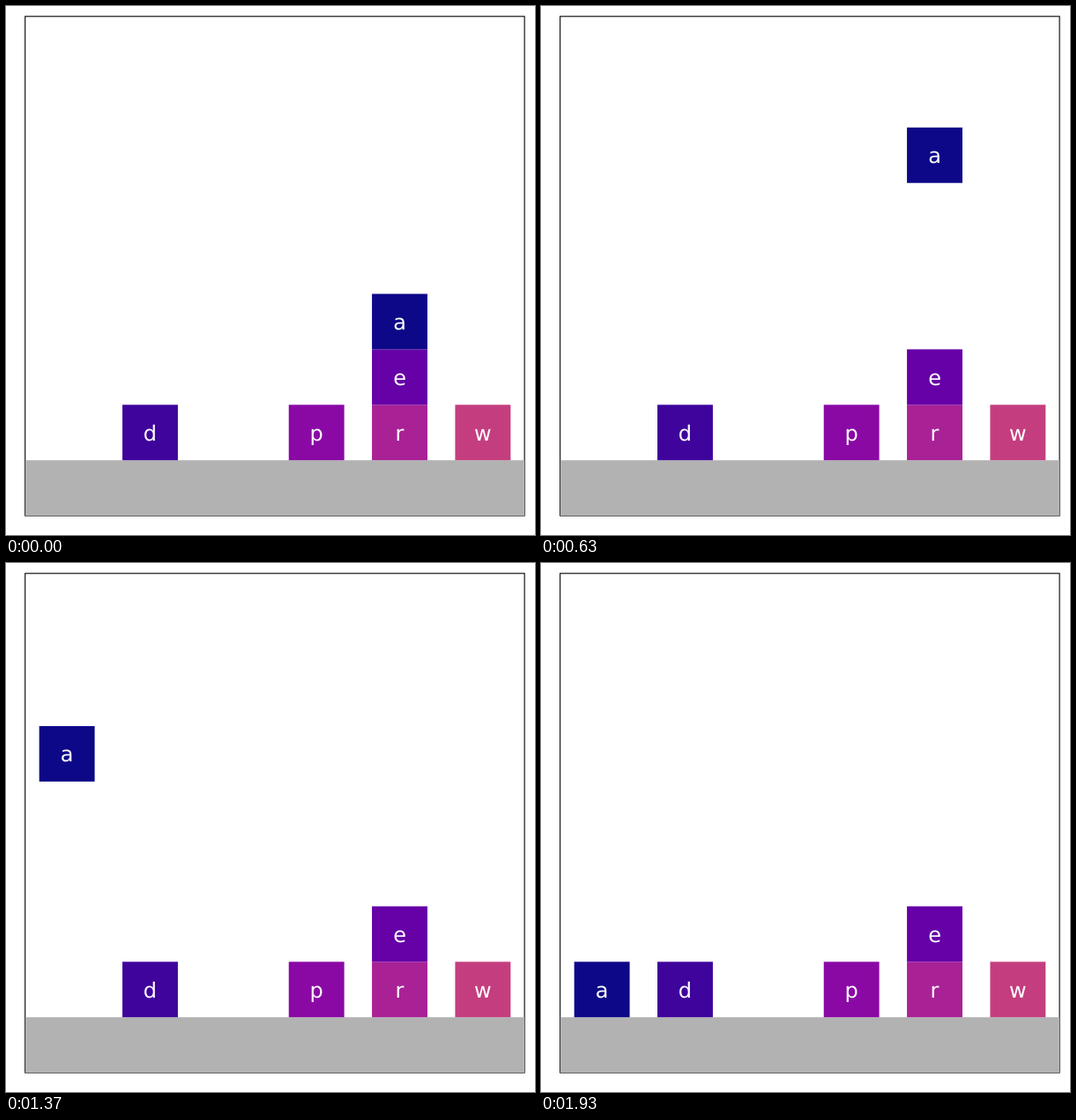
Write an HTML page that moves like this. It is 600 px wide and 600 px high and loops after 1.96 s.

```html
<!DOCTYPE html>
<html lang="en">
<head>
<meta charset="utf-8">
<title>Stacking blocks</title>
<style>
  html, body { margin: 0; width: 100%; height: 100%; overflow: hidden; background: #fff; }
  svg { display: block; width: 100vw; height: 100vh; }
  text {
    font: 24px "DejaVu Sans", sans-serif;
    fill: #fff;
    text-anchor: middle;
    text-rendering: geometricPrecision;
  }
</style>
</head>
<body>
<svg id="stage" viewBox="0 0 600 600"></svg>
<script>
const LOOP = 1960;
const UNIT = 62.9;
const LEFT = 21.95;
const TOP = 12;
const stage = document.getElementById("stage");

const colX = col => LEFT + (0.25 + 1.5 * col) * UNIT;
const rowY = row => TOP + (7 - row) * UNIT;
const clamp = v => Math.min(1, Math.max(0, v));
const mix = (a, b, p) => a + (b - a) * p;

function add(parent, tag, attrs, label = "") {
  const node = document.createElementNS("http://www.w3.org/2000/svg", tag);
  for (const key in attrs) node.setAttribute(key, attrs[key]);
  node.textContent = label;
  return parent.appendChild(node);
}

function place(block, col, row) {
  block.setAttribute("transform", `translate(${colX(col)} ${rowY(row)})`);
}

function addBlock(label, col, row, fill) {
  const block = add(stage, "g", {});
  add(block, "rect", { width: UNIT, height: UNIT, fill });
  add(block, "text", { x: UNIT / 2, y: 40.5 }, label);
  place(block, col, row);
  return block;
}

add(stage, "rect", {
  x: 21.7, y: 11.8, width: 566.4, height: 566.3,
  fill: "#fff", stroke: "#000", "stroke-width": 1.1
});
add(stage, "rect", {
  x: LEFT, y: rowY(-1), width: 9 * UNIT, height: UNIT, fill: "#b2b2b2"
});

addBlock("d", 1, 0, "#3f049c");
addBlock("p", 3, 0, "#8a09a5");
addBlock("r", 4, 0, "#a82296");
addBlock("e", 4, 1, "#6600a7");
addBlock("w", 5, 0, "#c43e7f");
const mover = addBlock("a", 4, 2, "#0d0887");

// Thirty steps per second, with step times rounded to 10 ms
const stepAt = ms => Math.floor((3 * Math.floor(ms / 10) + 1) / 10);

function draw(ms) {
  const step = stepAt(ms);
  // The lift and the slide each skip their first increment
  const lift = step < 1 ? 0 : clamp((step + 1) / 20);
  const slide = step < 30 ? 0 : clamp((step - 28) / 10);
  const drop = clamp((step - 38) / 20);
  place(mover, mix(4, 0, slide), mix(mix(2, 5, lift), 0, drop));
}

const start = performance.now();
function tick() {
  draw((performance.now() - start) % LOOP);
  requestAnimationFrame(tick);
}
tick();
</script>
</body>
</html>
```
